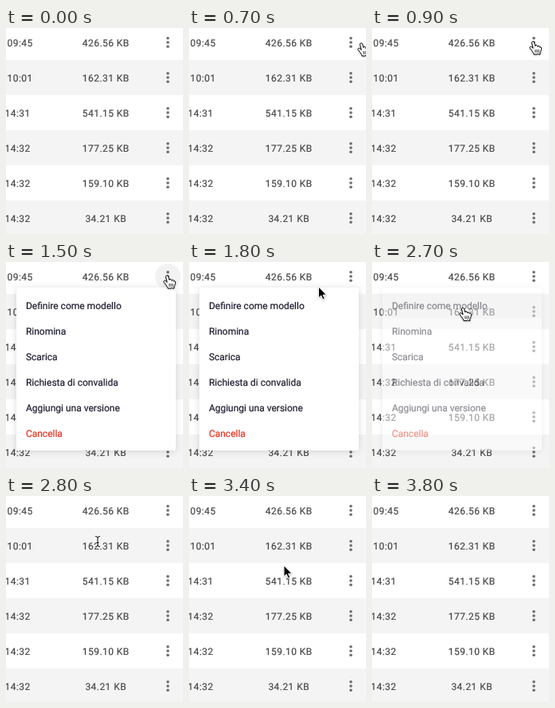
These frames come from a looping animation (222x258 px, 4.7 s). An HTML page:

```html
<!DOCTYPE html>
<html lang="it">
<head>
<meta charset="utf-8">
<title>Menu azioni</title>
<style>
html, body { margin: 0; width: 100%; height: 100%; overflow: hidden; background: #fff; }
svg { display: block; width: 222px; height: 258px; font-family: Roboto, Arial, sans-serif; }
text { font-size: 12px; text-rendering: geometricPrecision; stroke-width: .2px; }
.cell { letter-spacing: .45px; fill: #484848; stroke: #484848; }
.item { fill: #1c1c2e; stroke: #1c1c2e; }
.item.danger { fill: #e3301c; stroke: #e3301c; }
#panel { filter: drop-shadow(0 1px 4px rgba(0, 0, 0, .14)); }
#hand, #arrow { filter: drop-shadow(0 1px 1px rgba(0, 0, 0, .25)); }
</style>
</head>
<body>
<svg viewBox="0 0 222 258">
  <g id="rows"></g>
  <circle id="halo" cx="203" cy="18" r="16" fill="#000" fill-opacity=".05"/>
  <g id="menu">
    <rect id="panel" x="13" y="32" width="200" height="204" rx="2" fill="#fff"/>
    <rect id="hover" x="13" y="38.5" width="200" height="32" fill="#f4f4f5"/>
  </g>
  <g id="hand" stroke="#000" stroke-linejoin="round" stroke-linecap="round">
    <path fill="#fff" d="M-1.6 1.6C-1.6 0 1 0 1.5 1.5L2.8 6C2.9 4.5 5.2 4.5 5.6 6L5.8 7C6.2 5.5 8.2 5.6 8.4 7.2L8.5 8C9 6.8 10.4 7 10.5 8.6C10.6 11 9.6 12.5 8.9 14.2V16.5H6.8L6 15.7L5 16.5H1L.6 15C-1 12.5-2 11-3.8 8.9C-5 7.2-2.8 5.8-1.2 7.7L-.1 8.7Z"/>
    <path fill="none" stroke-width=".8" d="M2.9 10.8V14M5 10.8V14M7.1 10.8V14"/>
  </g>
  <path id="arrow" d="M0 0V14L3.2 11L5.4 16L7.8 15L5.6 10.2H10Z" fill="#000" stroke="#fff"/>
  <g id="beam" fill="none"></g>
</svg>
<script>
const LOOP = 4700, STEP = 100;
const $ = id => document.getElementById(id);

function add(parent, tag, attrs, text = "") {
  const el = document.createElementNS("http://www.w3.org/2000/svg", tag);
  for (const key in attrs) el.setAttribute(key, attrs[key]);
  el.textContent = text;
  parent.appendChild(el);
}

const files = [
  ["09:45", "426.56 KB"], ["10:01", "162.31 KB"], ["14:31", "541.15 KB"],
  ["14:32", "177.25 KB"], ["14:32", "159.10 KB"], ["14:32", "34.21 KB"]
];
files.forEach(([time, size], i) => {
  const y = 18 + 44 * i, rows = $("rows");
  if (i % 2) add(rows, "rect", { x: 0, y: y - 22, width: 222, height: 44, fill: "#f4f4f4" });
  add(rows, "text", { class: "cell", x: i < 2 ? 33.7 : 30.7, y: y + 5, "text-anchor": "end" }, time);
  add(rows, "text", { class: "cell", x: 125.3, y: y + 5, "text-anchor": "middle" }, size);
  for (const dy of [-5.2, 0, 5.2])
    add(rows, "circle", { cx: 203, cy: y + dy, r: 1.8, fill: "#6c6c6c" });
});

["Definire come modello", "Rinomina", "Scarica", "Richiesta di convalida",
  "Aggiungi una versione", "Cancella"].forEach((label, i) => {
  const cls = label === "Cancella" ? "item danger" : "item";
  add($("menu"), "text", { class: cls, x: 24.9, y: 59 + 32 * i }, label);
});

const beam = "M-3 -6.5Q0 -6.5 0 -4.5V4.5Q0 6.5 -3 6.5M3 -6.5Q0 -6.5 0 -4.5M0 4.5Q0 6.5 3 6.5M-1.5 1.5H1.5";
add($("beam"), "path", { d: beam, stroke: "#fff", "stroke-width": 2.4 });
add($("beam"), "path", { d: beam, stroke: "#000" });

// Pointer path: time, x, y
const path = [
  [700, 216, 18.5], [800, 206, 17.5], [900, 202, 16.5], [1500, 202, 16.5],
  [1600, 197, 19], [1700, 182, 24], [1800, 162.5, 31], [1900, 142, 41],
  [2000, 126, 50], [2100, 119, 54], [2200, 114, 57], [2700, 114, 57],
  [2800, 115, 57], [3200, 115, 57], [3300, 116, 62], [3400, 119, 87],
  [3500, 123, 128], [3600, 127, 180], [3700, 131, 237]
];

function pointerAt(t) {
  const i = Math.max(1, path.findIndex(p => p[0] >= t));
  const [t0, x0, y0] = path[i - 1], [t1, x1, y1] = path[i];
  const k = (t - t0) / (t1 - t0);
  return [x0 + (x1 - x0) * k, y0 + (y1 - y0) * k];
}

// Over a line of text the free pointer becomes a beam
function shapeAt(t, y) {
  if (t < 1600) return "hand";
  if (t < 1900) return "arrow";
  if (t < 2800) return "hand";
  return Math.abs((y + 4) % 44 - 22) <= 9 ? "beam" : "arrow";
}

function draw(t) {
  const visible = t >= 700 && t < 3800;
  const [x, y] = visible ? pointerAt(t) : [0, 0];
  const shape = visible ? shapeAt(t, y) : "";
  for (const id of ["hand", "arrow", "beam"]) {
    $(id).style.display = id === shape ? "" : "none";
    $(id).setAttribute("transform", `translate(${x} ${y})`);
  }
  $("menu").style.opacity = t < 1500 || t >= 2800 ? 0 : t >= 2700 ? .5 : 1;
  $("hover").style.display = t >= 1900 ? "" : "none";
  $("halo").style.opacity = t < 1500 || t >= 1800 ? 0 : t >= 1700 ? .4 : 1;
}

const start = performance.now();
function tick() {
  const t = (performance.now() - start) % LOOP;
  draw(Math.floor(t / STEP) * STEP);
  requestAnimationFrame(tick);
}
tick();
</script>
</body>
</html>
```
